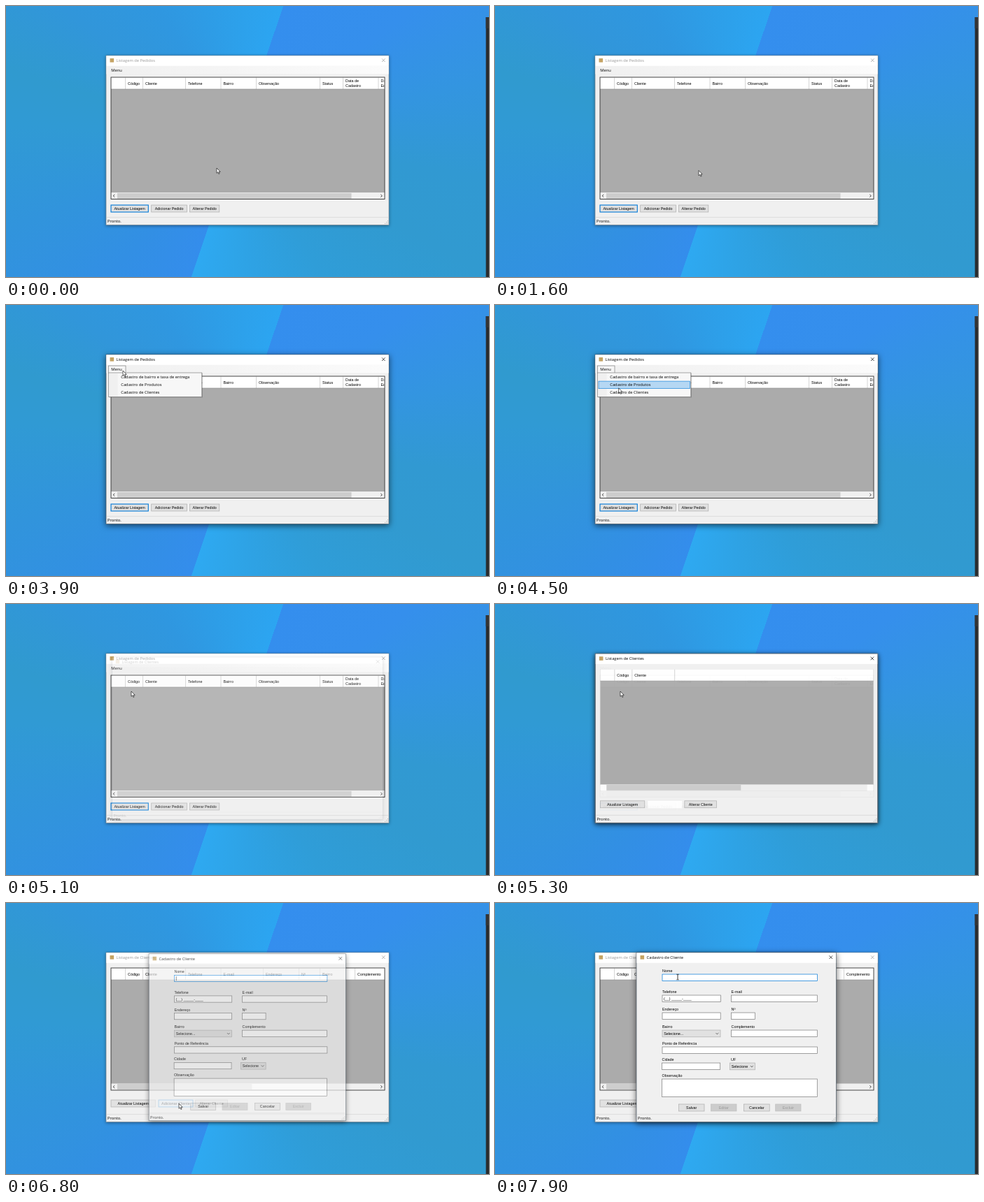
Recreate the animation shown at these times as an HTML page. Size 690 by 388 pixels, loop 8000 ms.

```html
<!DOCTYPE html>
<html lang="pt">
<head>
<meta charset="utf-8">
<title>Pedidos</title>
<style>
html, body { margin: 0; width: 100%; height: 100%; overflow: hidden; }
body {
  background: conic-gradient(from 18.66deg at 332px 190px,
    #348eee 0deg, #358fec 35deg, #3395e0 58deg, #3199d2 80deg, #319ad0 100deg,
    #2f9dd8 130deg, #2ea2e4 155deg, #2ea9f1 180deg, #348dec 180.2deg,
    #328fe4 205deg, #3194dc 230deg, #309ad4 255deg, #309acf 268deg,
    #3196da 288deg, #2f97e0 310deg, #2da0ea 340deg, #2ca5f1 360deg);
}
svg { display: block; width: 100vw; height: 100vh; }
text { white-space: pre; }
.ui { font: 5.75px "Open Sans", "Noto Sans", sans-serif; }
.ms { font: 5.4px "Liberation Sans", Arial, sans-serif; }
.mid { text-anchor: middle; }
.frame { fill: #f0f0f0; stroke: #7d8a94; stroke-width: .7; filter: drop-shadow(0 1px 2px #0006); }
.on .frame { stroke: #4c5a66; filter: drop-shadow(0 2px 4px #0009); }
.title { fill: #999; }
.close { fill: none; stroke: #999; stroke-width: .7; }
.on .title { fill: #000; }
.on .close { stroke: #000; }
.hot { fill: #e5f1fb; stroke: #0078d7; }
</style>
</head>
<body>
<svg id="stage" viewBox="0 0 690 388"></svg>
<script>
const LOOP = 8000, STEP = 100;

const box = (x, y, w, h, fill, stroke = 'none', sw = .7, id = '') =>
  `<rect ${id && `id="${id}"`} x="${x}" y="${y}" width="${w}" height="${h}" fill="${fill}" stroke="${stroke}" stroke-width="${sw}"/>`;
const text = (x, y, s, cls = 'ms', fill = '#000') =>
  `<text x="${x}" y="${y}" class="${cls}" fill="${fill}">${s}</text>`;
const path = (d, stroke = '#444', sw = .8) =>
  `<path d="${d}" fill="none" stroke="${stroke}" stroke-width="${sw}"/>`;
const group = (id, body) => `<g id="${id}">${body}</g>`;

function button(x, y, w, label, kind = '', id = '') {
  const [fill, stroke, ink, sw] = {
    focus: ['#e1e1e1', '#0078d7', '#000', 1.1],
    off: ['#ccc', '#bfbfbf', '#9a9a9a', .7]
  }[kind] || ['#e1e1e1', '#adadad', '#000', .7];
  return box(x, y, w, 10, fill, stroke, sw, id) + text(x + w / 2, y + 7, label, 'ms mid', ink);
}

// Window chrome: frame, title bar, icon, close mark, status bar with grip
function win(id, x, w, title, body) {
  const r = x + w, cx = r - 7.7;
  let grip = '';
  for (let i = 0; i < 3; i++)
    for (let j = 0; j <= i; j++) grip += box(r - 2 - j * 2, 307 + i * 2, 1, 1, '#b4b4b4');
  return group(id, `<rect class="frame" x="${x}" y="71" width="${w}" height="242.5"/>` +
    box(x + .4, 71.4, w - .8, 14.4, '#fff') + box(x + 5.5, 75, 5.6, 5.6, '#c5a363') +
    text(x + 14.6, 80.2, title, 'ui title', '') +
    `<path class="close" d="M${cx - 2.3} 75.4l4.6 4.6m0-4.6l-4.6 4.6"/>` +
    path(`M${x + 1} 302.6h${w - 2}`, '#d7d7d7', .7) +
    text(x + 2, 310.4, 'Pronto.', 'ui') + grip + body);
}

function columns(cols, y, first = 0) {
  return cols.slice(first).map(([x, s]) =>
    path(`M${x - 3.5} ${y}v16.5`, '#c4c4c4', .7) +
    s.split('|').map((line, i, all) =>
      text(x, y + 10.2 + (i - (all.length - 1) / 2) * 6.6, line)).join('')).join('');
}

const arrows = y => path(`M155.2 ${y - 1.9}l-2 1.9 2 1.9M535.3 ${y - 1.9}l2 1.9-2 1.9`, '#333', .9);

const orderCols = [[174, 'Código'], [199, 'Cliente'], [260, 'Telefone'], [310.5, 'Bairro'],
  [361, 'Observação'], [452, 'Status'], [485, 'Data de|Cadastro'], [535.5, 'Data de|Edição']];
const clientCols = [[174, 'Código'], [199, 'Cliente'], [260, 'Telefone'], [310.5, 'E-mail'],
  [371, 'Endereço'], [422, 'Nº'], [452, 'Bairro'], [502, 'Complemento']];
const menuItems = ['Cadastro de bairro e taxa de entrega', 'Cadastro de Produtos', 'Cadastro de Clientes'];

const orders = win('orders', 143, 404, 'Listagem de Pedidos',
  box(143.4, 86, 403.2, 11.5, 'url(#strip)') +
  box(146.5, 87, 24.5, 10, '#b5d7f3', '#0078d7', .6, 'menuHot') +
  group('drop',
    box(146.5, 87, 24.5, 10.5, '#f6f6f6', '#808080')) +
  text(150.3, 94.2, 'Menu', 'ui') +
  box(150, 102, 391, 174.5, '#ababab') + box(150, 102, 391, 17, '#fff') +
  `<g clip-path="url(#grid)">${columns(orderCols, 102.5)}</g>` +
  path('M150 119h391', '#8c8c8c', .6) +
  box(150, 267, 391, 9.3, '#f0f0f0') + box(159, 267.8, 334.5, 8, '#cdcdcd') + arrows(271.8) +
  box(150, 102, 391, 174.5, 'none', '#333', .9) +
  button(150, 285, 53.3, 'Atualizar Listagem', 'focus') +
  button(207.7, 285, 50.8, 'Adicionar Pedido') +
  button(262.6, 285, 42.2, 'Alterar Pedido') +
  group('list',
    box(147, 97.5, 134, 35, '#0003') +
    box(146.5, 97, 133.3, 34.5, '#f7f7f7', '#808080') + box(147.5, 98, 12, 32.5, '#f0f0f0') +
    box(148, 98, 130.5, 10.6, '#b5d7f3', '#0078d7', .6, 'pick') +
    menuItems.map((s, i) => text(164.3, 105.2 + i * 11.1, s, 'ui')).join('')));

const clients = win('clients', 143, 404, 'Listagem de Clientes', group('clientBody',
  box(150, 93, 391, 175, '#ababab') + box(150, 93, 391, 17, '#fff') +
  columns(clientCols.slice(0, 2), 93.5) + path('M256.5 93.5v16.5', '#c4c4c4', .7) +
  path('M150 110h391', '#8c8c8c', .6) +
  box(150, 258.5, 391, 9.5, '#f0f0f0') +
  box(150, 259, 9, 8.5, '#fff') + box(532, 259, 9, 8.5, '#fff') +
  box(159, 259, 192.3, 8, '#cdcdcd') +
  button(150, 282, 63.5, 'Atualizar Listagem') + box(218, 282, 49, 10.5, '#fff') +
  button(270.7, 282, 45.8, 'Alterar Cliente') +
  group('late',
    columns(clientCols, 93.5, 2) + box(150.4, 259, 8.6, 8.5, '#f0f0f0') +
    box(532, 259, 8.6, 8.5, '#f0f0f0') + arrows(263.2) +
    box(150, 93, 391, 175, 'none', '#333', .9) +
    button(218, 282, 49, 'Adicionar Cliente', '', 'add'))));

const field = (x, y, w, label, h = 9.4, stroke = '#7a7a7a') =>
  text(x, y - 3, label) + box(x, y, w, h, '#fff', stroke);
const combo = (x, y, w, label, dx = 0) =>
  text(x + dx, y - 3, label) + box(x, y, w, 9.8, '#e1e1e1', '#adadad') +
  text(x + 2.2, y + 7, 'Selecione' + (dx ? '' : '...')) +
  path(`M${x + w - 6.5} ${y + 4}l1.9 1.9 1.9-1.9`);

const form = win('form', 202, 285.5, 'Cadastro de Cliente',
  field(239, 102, 221.6, 'Nome', 9.4, '#0078d7') +
  field(239, 132, 83.4, 'Telefone') + text(241, 139, '(__) _____-____') +
  field(337.5, 132, 122.8, 'E-mail') +
  field(239, 157, 83.2, 'Endereço') + field(337.5, 157, 34, 'Nº') +
  combo(239, 182, 83, 'Bairro') + field(337.5, 182, 122.8, 'Complemento') +
  field(239, 206, 221.6, 'Ponto de Referência') +
  field(238.5, 229, 83.2, 'Cidade') + combo(335.5, 229, 36, 'UF', 1.5) +
  field(238.5, 252, 221.8, 'Observação', 25.6) +
  button(262.5, 288, 36.5, 'Salvar') + button(308.5, 288, 36.5, 'Editar', 'off') +
  button(355.5, 288, 36.7, 'Cancelar') + button(400.7, 288, 36.3, 'Excluir', 'off') +
  group('caret', path('M241.7 103.8v6', '#000', .6)));

const $ = id => document.getElementById(id);
$('stage').innerHTML = `<defs>
  <linearGradient id="strip"><stop offset="0" stop-color="#f0f0f0"/><stop offset="1" stop-color="#fbfbfb"/></linearGradient>
  <clipPath id="grid"><rect x="150" y="102" width="390.5" height="17"/></clipPath></defs>` +
  box(685.6, 16, 4.4, 372, '#2a2c2e') + box(685.6, 16, 4.4, 16, '#343434') +
  orders + clients + form +
  group('mouse',
    '<path id="arrow" d="M0 0V7.3L1.7 5.8 2.9 8.5 4.1 8 2.9 5.4H5.2Z" fill="#fff" stroke="#000" stroke-width=".6"/>' +
    group('beam', path('M-1.6-3.8H-.4L0-3.4.4-3.8H1.6M0-3.4V3.4M-1.6 3.8H-.4L0 3.4.4 3.8H1.6', '#000', .8)));

// Pointer stops: time, x, y
const stops = [[0, 301, 232], [100, 301, 232], [500, 296, 235], [1500, 296, 235], [1600, 291, 235.5],
  [2400, 205, 237], [2900, 171, 79], [3000, 171, 79], [3400, 167, 94], [4000, 167, 94],
  [4700, 179, 125], [5300, 179, 125], [5700, 218, 234], [6000, 247, 287], [7200, 247, 287],
  [7700, 261, 106], [LOOP, 261, 106]];

function pointer(t) {
  const i = stops.findIndex(s => s[0] > t);
  const [t0, x0, y0] = stops[i - 1], [t1, x1, y1] = stops[i];
  const p = (t - t0) / (t1 - t0), e = p * p * (3 - 2 * p);
  return [x0 + (x1 - x0) * e, y0 + (y1 - y0) * e];
}

const show = (id, on) => { $(id).style.display = on ? '' : 'none'; };
const active = (id, on) => $(id).classList.toggle('on', on);

// Windows fade in while growing to full size
function open(id, t, start, cx) {
  const p = Math.max(0, Math.min(1, (t - start) / 250)), s = .95 + .05 * p;
  show(id, p > 0);
  $(id).style.opacity = p;
  $(id).setAttribute('transform', `translate(${cx} 192) scale(${s}) translate(${-cx} -192)`);
}

function draw(t) {
  const [x, y] = pointer(t);
  const menu = t >= 3500 && t < 4900;
  show('orders', t < 5400);
  active('orders', t >= 3200 && t < 5000);
  show('menuHot', t >= 3200 && t < 3500);
  show('drop', menu);
  show('list', menu);
  const row = Math.floor((y - 97.5) / 11.1);
  show('pick', row >= 0);
  $('pick').setAttribute('y', 98 + Math.max(0, Math.min(2, row)) * 11.1);

  open('clients', t, 5060, 345);
  active('clients', t < 6600);
  show('clientBody', t >= 5200);
  show('late', t >= 5400);
  $('add').classList.toggle('hot', t >= 5900);

  open('form', t, 6625, 344.7);
  active('form', true);
  show('caret', t < 7400);

  $('mouse').setAttribute('transform', `translate(${x} ${y})`);
  show('arrow', t < 7700);
  show('beam', t >= 7700);
}

const begin = performance.now();
let last = -1;
function tick() {
  const t = Math.floor((performance.now() - begin) % LOOP / STEP) * STEP;
  if (t !== last) draw(last = t);
  requestAnimationFrame(tick);
}
tick();
</script>
</body>
</html>
```
